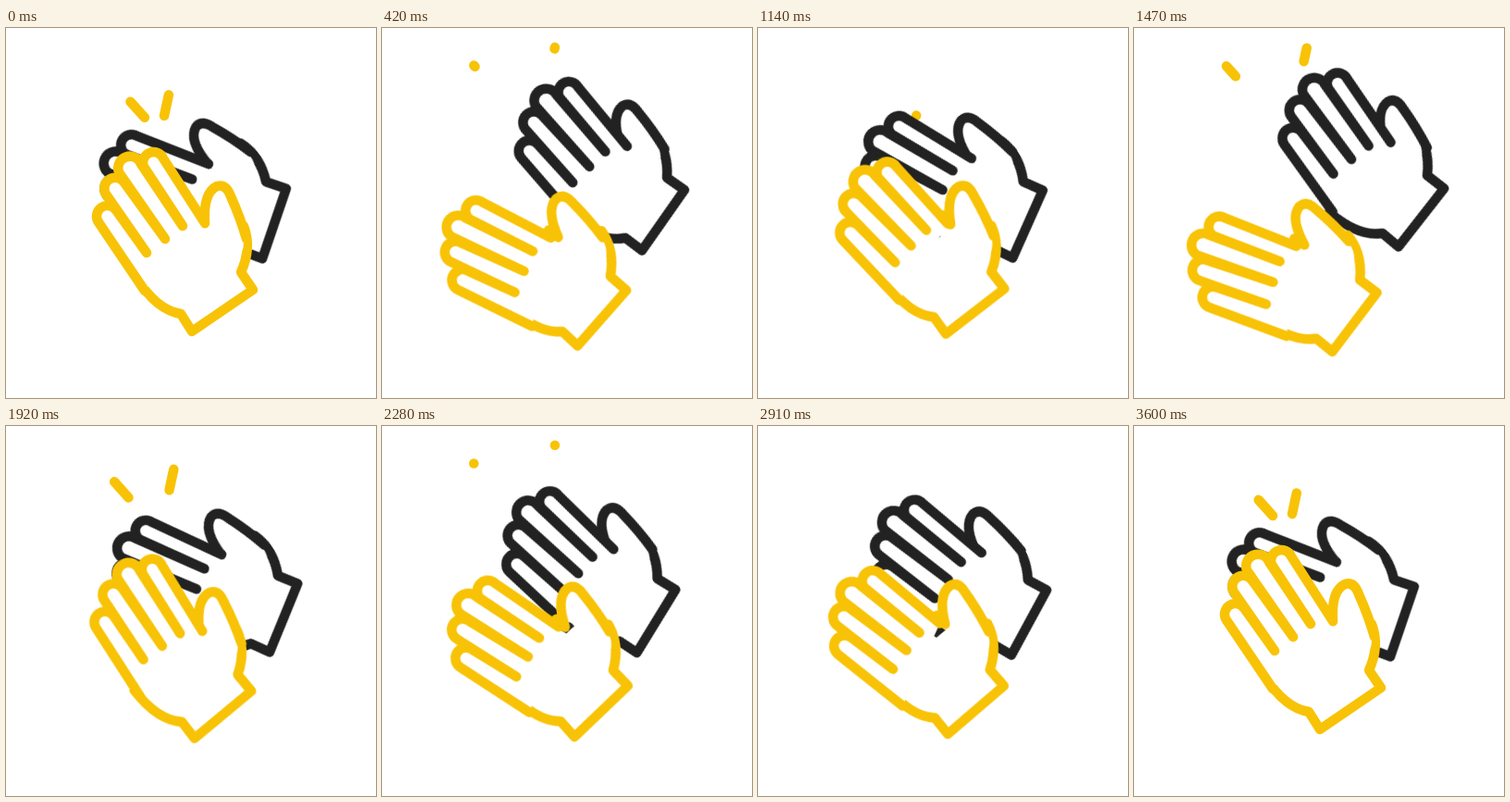
An HTML page without scripts for the animation above (4130 ms loop, 400 by 400 pixels).

```html
<!DOCTYPE html>
<html lang="en">
<head>
<meta charset="utf-8">
<title>Clapping hands</title>
<style>
  @property --bend { syntax: "<angle>"; inherits: true; initial-value: 0deg; }

  html, body { margin: 0; width: 100%; height: 100%; overflow: hidden; background: #fff; }
  svg { display: block; width: 100vw; height: 100vh; }
  path { fill: #fff; stroke-width: 10.5; stroke-linecap: round; stroke-linejoin: round; }

  .hand { transform-origin: 234px 305.5px; animation: clap 4130ms linear infinite; }
  .fingers, .thumb { transform-origin: 196px 258px; }
  .fingers { transform: rotate(var(--bend)); }
  .thumb { transform: rotate(calc(var(--bend) * .4)); }
  .inside { stroke: #fff; stroke-width: 50; }
  .spark { fill: none; animation: spark 4130ms linear infinite; }
  .front, .spark { stroke: #f8c306; }
  .back { stroke: #222; }

  .front {
    --shut: translate(0px, 0px) rotate(0deg);              --shut-bend: 0deg;
    --part: translate(.5px, 6.5px) rotate(-5.3deg);        --part-bend: 7deg;
    --wide: translate(4px, 11.5px) rotate(-15deg);         --wide-bend: -10deg;
    --full: translate(4.5px, 12.5px) rotate(-18.6deg);     --full-bend: -17deg;
    --return: translate(3px, 3px) rotate(-9.5deg);         --return-bend: -13.5deg;
    --near: translate(1.5px, 1.5px) rotate(-6.4deg);       --near-bend: -11deg;
  }
  .back {
    --shut: translate(56px, -94px) rotate(-36.9deg);       --shut-bend: 1deg;
    --part: translate(66px, -98px) rotate(-33.7deg);       --part-bend: 1deg;
    --wide: translate(76px, -100.5px) rotate(-21.1deg);    --wide-bend: 9.4deg;
    --full: translate(76.5px, -100.5px) rotate(-17.7deg);  --full-bend: 16deg;
    --return: translate(62.5px, -94.5px) rotate(-24.1deg); --return-bend: 11.3deg;
    --near: translate(59px, -93px) rotate(-27.2deg);       --near-bend: 10deg;
  }

  /* Five claps of 600 ms; the last one settles slowly, then rests. */
  @keyframes clap {
    0%, 14.53%, 29.06%, 43.58%, 58.11%, 87.17%, 100% { transform: var(--shut); --bend: var(--shut-bend); animation-timing-function: cubic-bezier(.4, .1, .8, .7); }
    2.91%, 17.43%, 31.96%, 46.49%, 61.02% { transform: var(--part); --bend: var(--part-bend); }
    4.36%, 18.89%, 33.41%, 47.94%, 62.47% { transform: var(--wide); --bend: var(--wide-bend); animation-timing-function: cubic-bezier(.2, .5, .6, .9); }
    6.54%, 21.07%, 35.59%, 50.12%, 64.65% { transform: var(--full); --bend: var(--full-bend); animation-timing-function: cubic-bezier(.4, -.25, .75, .5); }
    11.62%, 26.15%, 40.68%, 55.21%, 69.73% { transform: var(--return); --bend: var(--return-bend); }
    12.35%, 26.88%, 41.4%, 55.93%, 70.46% { transform: var(--near); --bend: var(--near-bend); animation-timing-function: cubic-bezier(.3, .4, .6, .9); }
  }
  @keyframes spark {
    0%, 14.53%, 29.06%, 43.58%, 58.11%, 87.17%, 100% { stroke-dasharray: 23 200; stroke-dashoffset: 0; }
    4.36%, 18.89%, 33.41%, 47.94%, 62.47% { stroke-dasharray: 23 200; stroke-dashoffset: -39; }
    6.54%, 21.07%, 35.59%, 50.12%, 64.65% { stroke-dasharray: 15 200; stroke-dashoffset: -60; animation-timing-function: ease-out; }
    11.62%, 26.15%, 40.68%, 55.21%, 69.73% { stroke-dasharray: 0 200; stroke-dashoffset: -76; opacity: 1; animation-timing-function: step-end; }
    12.35%, 26.88%, 41.4%, 55.93%, 70.46% { stroke-dasharray: 0 200; stroke-dashoffset: 0; opacity: 0; animation-timing-function: step-end; }
    13.08%, 27.6%, 42.13%, 56.66%, 82.81% { stroke-dasharray: 0 200; stroke-dashoffset: 0; opacity: 1; }
  }
</style>
</head>
<body>
<svg viewBox="0 0 400 400">
  <defs>
    <g id="hand">
      <path d="M257 214Q266 238 254 264L267 283 201 328 189 309Q163 305 141 270"/>
      <path class="inside" d="M205 250L232 232"/>
      <path class="thumb" d="M208 200L215 211Q213 178 228 171Q238 168 243 182Q253 204 260 228"/>
      <path class="fingers" d="M150 284L100 210A9 9 0 0 1 119 197L152 243 109 181A9 9 0 0 1 127 166L172 228 122 156A9 9 0 0 1 146 147L191 214 149 150A9 9 0 0 1 170 141L215 211"/>
    </g>
  </defs>
  <path class="spark" d="M150 97L98 39"/>
  <path class="spark" d="M171 95L187.5 18"/>
  <g class="hand back"><use href="#hand"/></g>
  <g class="hand front"><use href="#hand"/></g>
</svg>
</body>
</html>
```
